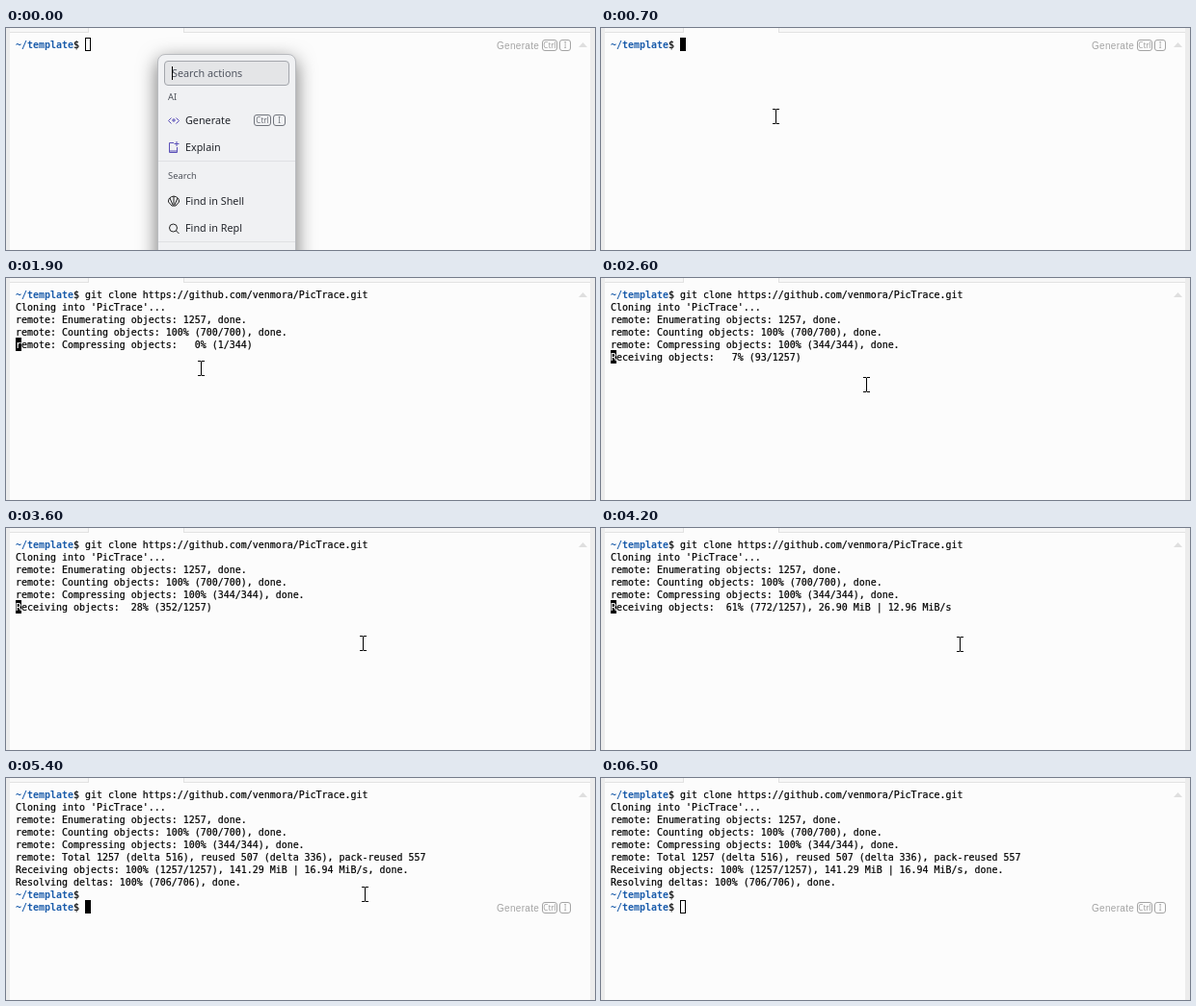
An HTML page for the animation above (6.6 s loop, 611x231 px).

```html
<!DOCTYPE html>
<html lang="en">
<head>
<meta charset="utf-8">
<title>Shell clone</title>
<style>
html, body { margin: 0; width: 100%; height: 100%; overflow: hidden; background: #ececec; }
#stage { position: relative; width: 611px; height: 231px; overflow: hidden; }
#stage * { position: absolute; box-sizing: border-box; white-space: pre; }
#pane { left: 4px; top: 0; width: 602px; height: 231px; background: #fcfcfc; }
.tab { top: 0; height: 5px; background: #f7f7f7; border: solid #e2e2e2; border-width: 0 0 1px; }
#term, #cursor { font: 9.966px/13px "DejaVu Sans Mono", monospace; color: #000;
  -webkit-text-stroke: .2px; }
#term { left: 10px; top: 11px; margin: 0; }
#stage #term b { position: static; color: #1a5cab; -webkit-text-stroke: 0; }
#cursor { width: 6px; height: 14px; line-height: 15px; border: 1px solid #000; }
#cursor.block { border: 0; background: #000; color: #fff; }
#hint { left: 509px; width: 78px; height: 13px; color: #a4a4a4; }
#hint span { font: 10px/13px "Liberation Sans", Arial, sans-serif; letter-spacing: .3px; }
.key { height: 12px; border: 1px solid; border-radius: 3px; text-align: center;
  font: 8px/10px "Noto Sans", sans-serif; }
#menu { left: 157px; top: 27px; width: 144px; height: 260px; background: #f0f1f3;
  border: 1px solid #b9bbbf; border-radius: 8px; box-shadow: 0 6px 20px rgba(0,0,0,.55);
  font: 10.8px/16px "Noto Sans", sans-serif; color: #22252b; }
#menu i { left: 0; width: 142px; height: 1px; background: #dfe0e3; }
#menu small { left: 10px; font-size: 9.4px; color: #50545c; }
#menu span { left: 28px; }
#menu .key { color: #70747c; }
#field { left: 6px; top: 6px; width: 130px; height: 26px; background: #e4e5e7;
  border: 1px solid #a3a6ac; border-radius: 4px; color: #505560; padding: 4px 7px; }
#caret { left: 14px; top: 12px; width: 1px; height: 14px; background: #000; }
svg { left: 0; top: 0; fill: none; }
</style>
</head>
<body>
<div id="stage">
  <div id="pane">
    <div class="tab" style="left:0;width:82px;border-right-width:1px"></div>
    <div class="tab" style="left:180px;width:422px;border-left-width:1px"></div>
  </div>
  <pre id="term"></pre>
  <div id="cursor"></div>
  <div id="hint"><span>Generate</span>
    <div class="key" style="left:47px;top:0;width:16px">Ctrl</div>
    <div class="key" style="left:65px;top:0;width:12px">I</div>
  </div>
  <svg width="611" height="231"><path d="M594 20l4.5-5 4.5 5z" fill="#dfdfdf"/></svg>
  <div id="menu">
    <div id="field">Search actions</div><div id="caret"></div>
    <small style="top:36px">AI</small>
    <span style="top:60px">Generate</span>
    <div class="key" style="left:99px;top:62px;width:18px">Ctrl</div>
    <div class="key" style="left:119px;top:62px;width:13px">I</div>
    <span style="top:88px">Explain</span>
    <i style="top:110px"></i>
    <small style="top:118px">Search</small>
    <span style="top:144px">Find in Shell</span>
    <span style="top:172px">Find in Repl</span>
    <i style="top:194px"></i>
    <svg width="142" height="200">
      <g stroke="#5b50b8">
        <path d="M13.500 65.500l-3 3 3 3M18.500 65.500l3 3-3 3M16 66v4M14 68h4"/>
        <path d="M16 91.500h-4.500v8.500h8v-4M11.500 100v1.500h8v-1.500M19 90v5M16.500 92.500h5"/>
      </g>
      <g stroke="#222">
        <path d="M14 157l-3.500-4q-.5-5 5.500-6 6 1 5.500 6l-3.500 4zM16 157v-10M15 156l-3-7M17 156l3-7"/>
        <circle cx="15.500" cy="180" r="4"/><path d="M18.500 183l3 3"/>
      </g>
    </svg>
  </div>
  <svg id="mouse" width="611" height="231"><path d="M-3.500-7.500h3l.5 1 .5-1h3M0-7v14M-3.500 7.500h3l.5-1 .5 1h3" stroke="#000"/></svg>
</div>
<script>
const $ = id => document.getElementById(id);
const LOOP = 6600;
const PROMPT = "~/template$ ";
const COMMAND = "git clone https://github.com/venmora/PicTrace.git";

// time, x, y
const mousePath = [
  [100, 195, 222], [700, 181, 92], [1100, 181, 92], [1500, 193, 92], [1900, 202, 94],
  [2100, 206, 97], [2800, 302, 117], [3500, 369, 120], [3600, 370, 120],
  [4200, 372, 121], [5400, 372, 121], [5600, 349, 139], [6300, 195, 225]
];
// time, objects received, MiB received, MiB/s
const received = [
  [2500, 13, 0, 0], [2800, 252, 0, 0], [3600, 352, 0, 0], [3800, 460, 9.4, 12.1],
  [4800, 1240, 53.14, 14.26], [5200, 1250, 135.6, 16.8]
];

function sample(keys, t) {
  const n = keys.findIndex(k => k[0] > t);
  if (n === 0) return keys[0].slice(1);
  if (n < 0) return keys[keys.length - 1].slice(1);
  const a = keys[n - 1], b = keys[n], u = (t - a[0]) / (b[0] - a[0]);
  return a.slice(1).map((v, i) => v + (b[i + 1] - v) * u);
}

function progress(label, done, total, tail = "") {
  const percent = String(Math.floor(done * 100 / total)).padStart(3);
  return `${label}: ${percent}% (${done}/${total})${tail}`;
}

function counter(label, total, start, end, t) {
  const u = Math.min(1, (t - start) / (end - start));
  return progress(label, Math.max(1, Math.round(total * u)), total, u === 1 ? ", done." : "");
}

function receiving(t) {
  if (t >= 5200) return progress("Receiving objects", 1257, 1257, ", 141.29 MiB | 16.94 MiB/s, done.");
  const [count, size, speed] = sample(received, t);
  const rate = t < 3800 ? "" : `, ${size.toFixed(2)} MiB | ${speed.toFixed(2)} MiB/s`;
  return progress("Receiving objects", Math.round(count), 1257, rate);
}

function terminal(t) {
  const rows = [PROMPT + (t >= 1000 ? COMMAND : "")];
  const add = (start, text) => { if (t >= start) rows.push(text()); };
  add(1200, () => "Cloning into 'PicTrace'...");
  add(1400, () => "remote: Enumerating objects: 1257, done.");
  add(1500, () => counter("remote: Counting objects", 700, 1500, 1800, t));
  add(1900, () => counter("remote: Compressing objects", 344, 1900, 2400, t));
  add(5200, () => "remote: Total 1257 (delta 516), reused 507 (delta 336), pack-reused 557");
  add(2500, () => receiving(t));
  add(5300, () => counter("Resolving deltas", 706, 5200, 5400, t));
  add(5400, () => PROMPT);
  add(5400, () => PROMPT);
  return rows;
}

function draw(now) {
  const t = Math.floor(now % LOOP / 100) * 100;
  const rows = terminal(t), last = rows.length - 1;
  const atPrompt = rows[last].startsWith(PROMPT);
  const focused = t >= 100 && t < 6400;
  $("term").innerHTML = rows.join("\n").replaceAll("~/template", "<b>~/template</b>");

  const col = atPrompt ? rows[last].length : 0;
  const cursor = $("cursor");
  cursor.className = focused ? "block" : "";
  cursor.textContent = rows[last][col] || "";
  cursor.style.left = 10 + col * 6 + "px";
  cursor.style.top = 10 + last * 13 + "px";

  $("hint").hidden = !(t < 1000 || t >= 5400);
  $("hint").style.top = 12 + last * 13 + "px";
  $("menu").hidden = t >= 100;

  const [x, y] = sample(mousePath, t).map(Math.round);
  $("mouse").style.display = focused ? "" : "none";
  $("mouse").firstChild.setAttribute("transform", `translate(${x + .5} ${y})`);
}

const begin = performance.now();
function tick() {
  draw(performance.now() - begin);
  requestAnimationFrame(tick);
}
tick();
</script>
</body>
</html>
```
